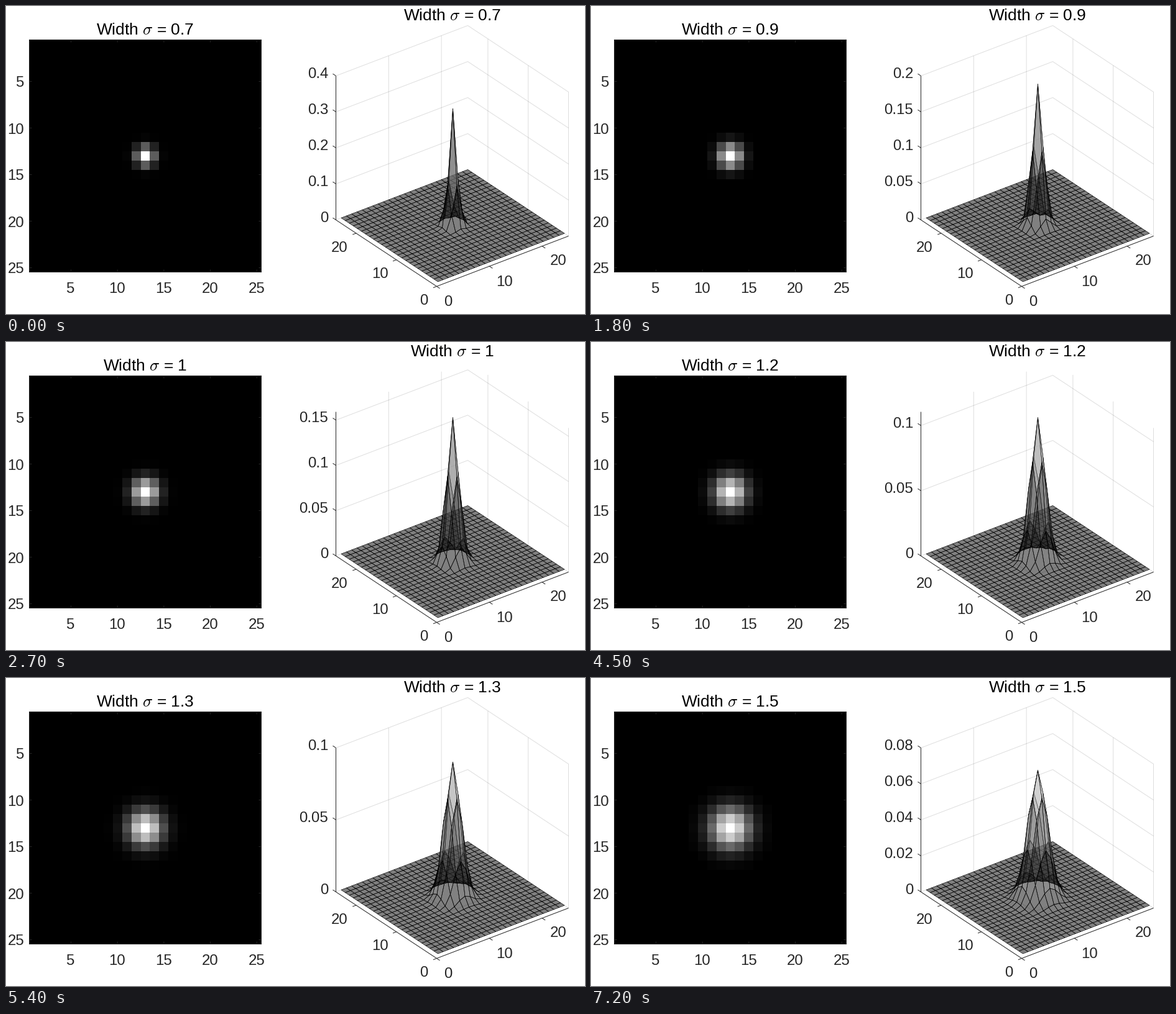
A matplotlib script for the animation above (8 s loop, 931 by 496 pixels).

```python
import math

import matplotlib.pyplot as plt
import numpy as np
from matplotlib.animation import FuncAnimation
from matplotlib.collections import LineCollection, PolyCollection

W, H, DPI = 931, 496, 100
PX = 72 / DPI            # points per pixel
N = 25                   # kernel size
STEPS_PER_WIDTH = 9      # each width is held for 900 ms
INK = "#262626"

plt.rcParams["font.family"] = "Liberation Sans"
plt.rcParams["mathtext.fontset"] = "cm"

fig = plt.figure(figsize=(W / DPI, H / DPI), dpi=DPI, facecolor="white")
ax = fig.add_axes([0, 0, 1, 1])

# Axonometric box: origin corner and the screen vector of each axis
ORIGIN = np.array([692.5, 451.5])
X_AXIS = np.array([212.0, -81.0])
Y_AXIS = np.array([-162.0, -107.0])
Z_AXIS = np.array([0.0, -232.0])


def project(x, y, z):
    """Screen position; x and y run to N, z is a fraction of the height."""
    x, y, z = (np.asarray(v, float)[..., None] for v in (x, y, z))
    return ORIGIN + x / N * X_AXIS + y / N * Y_AXIS + z * Z_AXIS


def tick(point, direction, length=6):
    return [point, point + length * direction / np.hypot(*direction)]


def add_lines(segments, zorder, alpha=1.0):
    lines = LineCollection(segments, colors=INK, alpha=alpha,
                           linewidths=PX, zorder=zorder)
    lines.set_snap(False)
    return ax.add_collection(lines, autolim=False)


def label(x, y, text="", ha="center"):
    """Tick label whose digits are centred on y."""
    return ax.text(x, y + 8, text, ha=ha, va="baseline",
                   fontsize=24 * PX, color=INK)


def title(x, y):
    return ax.text(x, y, "", ha="center", va="baseline",
                   fontsize=26.4 * PX, color="black")


def kernel(sigma):
    r = np.arange(N) - N // 2
    g = np.exp(-(r[:, None] ** 2 + r ** 2) / (2 * sigma ** 2))
    return g / g.sum()


def z_scale(peak):
    """Tick step and upper limit of the vertical axis."""
    step = next(s for s in (0.02, 0.05, 0.1) if math.ceil(peak / s) <= 4)
    top = step * math.ceil(peak / step)
    return step, (top if peak / top > 0.8 else peak)


# Left panel: kernel as an image
L, R, T, B = 37.3, 410.7, 54, 429
image = ax.pcolormesh(np.linspace(L, R, N + 1), np.linspace(T, B, N + 1),
                      np.zeros((N, N)), cmap="gray", vmin=0, vmax=1,
                      antialiased=False)
left, right, top_edge, bottom = 37.5, 410.5, 54.5, 428.5
frame = [[(left, top_edge), (right, top_edge), (right, bottom),
          (left, bottom), (left, top_edge)]]
for v in range(5, N + 1, 5):
    x = L + (v - 0.5) * (R - L) / N
    y = T + (v - 0.5) * (B - T) / N
    frame += [[(x, top_edge), (x, top_edge + 4)], [(x, bottom), (x, bottom - 4)],
              [(left, y), (left + 4, y)], [(right, y), (right - 4, y)]]
    label(x - 0.5, 454, str(v))
    label(29, y + 1, str(v), ha="right")
add_lines(frame, 3)

# Right panel: box, static grid and floor ticks
grid, marks = [], []
for v in (0, 10, 20):
    if v:
        grid.append(project([v, v, v], [0, N, N], [0, 0, 1]))
        grid.append(project([0, N, N], [v, v, v], [0, 0, 1]))
    marks.append(tick(project(v, 0, 0), -Y_AXIS))
    marks.append(tick(project(0, v, 0), -X_AXIS))
grid.append(project([N, N], [0, 0], [0, 1]))
marks.append(project([N, 0, 0, 0], [0, 0, N, N], [0, 0, 0, 1]))
add_lines(grid, 1, alpha=0.15)
add_lines(marks, 4)

for x, y, text in ((711, 475, "0"), (802, 443, "10"), (888, 409, "20"),
                   (672, 473, "0"), (601, 430, "10"), (536, 388, "20")):
    label(x, y, text)

z_grid = add_lines([], 1, alpha=0.15)
z_ticks = add_lines([], 4)
z_labels = [label(518, 0, ha="right") for _ in range(5)]

surface = PolyCollection([], linewidths=0.6 * PX, edgecolors="black", zorder=2)
ax.add_collection(surface, autolim=False)
titles = [title(223.5, 46), title(718, 23)]

# Faces from back to front
col, row = np.meshgrid(np.arange(N - 1), np.arange(N - 1))
order = np.argsort(-(col + row).ravel(), kind="stable")
col, row = col.ravel()[order], row.ravel()[order]
GX, GY = np.meshgrid(np.arange(1, N + 1), np.arange(1, N + 1))

ax.set_xlim(0, W)
ax.set_ylim(H, 0)
ax.axis("off")


def update(i):
    sigma = round(0.7 + 0.1 * (i // STEPS_PER_WIDTH), 1)
    g = kernel(sigma)
    peak = g.max()
    shade = g / peak
    step, top = z_scale(peak)

    image.set_array(shade)
    for t in titles:
        t.set_text(rf"Width $\sigma$ = {sigma:g}")

    pts = project(GX, GY, g / top)
    quads = np.stack([pts[row, col], pts[row, col + 1],
                      pts[row + 1, col + 1], pts[row + 1, col]], axis=1)
    surface.set_verts(quads)
    colors = np.full((len(row), 4), 0.5)
    colors[:, :3] = shade[row, col][:, None]
    surface.set_facecolor(colors)

    levels = np.arange(0, top + 1e-9, step)
    z_grid.set_segments([project([0, N, N], [N, N, 0], [v / top] * 3)
                         for v in levels])
    ends = [project(0, N, v / top) for v in levels]
    z_ticks.set_segments([tick(p, Y_AXIS) for p in ends])
    for k, t in enumerate(z_labels):
        t.set_visible(k < len(levels))
        if k < len(levels):
            t.set_text(f"{levels[k]:g}")
            t.set_y(ends[k][1] + 3.5)
    return [image, surface, z_grid, z_ticks, *z_labels, *titles]


anim = FuncAnimation(fig, update, frames=80, interval=100, repeat=True,
                     repeat_delay=0, blit=False)
plt.show()
```
